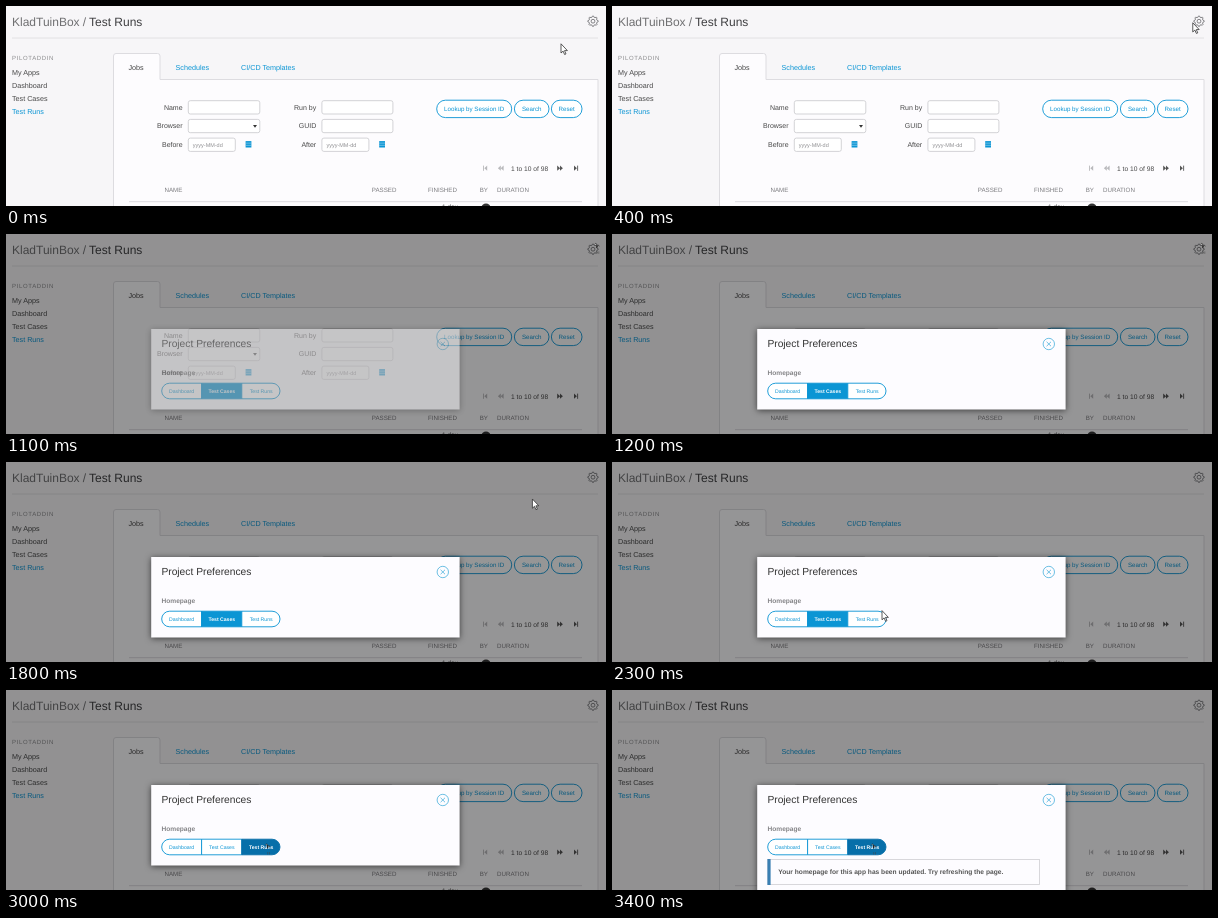
An HTML page for the animation above (3500 ms loop, 600 by 200 pixels).

```html
<!DOCTYPE html>
<html lang="en">
<head>
<meta charset="utf-8">
<title>Project preferences</title>
<style>
  html, body { margin: 0; width: 100%; height: 100%; overflow: hidden; background: #f7f6f8; }
  svg { display: block; width: 600px; height: 200px; }
  text { font-family: "Liberation Sans", Arial, sans-serif; text-rendering: geometricPrecision; white-space: pre; }
</style>
</head>
<body>
<svg id="stage" viewBox="0 0 600 200">
  <g id="page"></g>
  <rect id="dim" width="600" height="200" fill="#000" opacity="0"/>
  <g id="dialog"></g>
  <g id="arrow">
    <path d="M0 0V9.2L2.1 7.3L3.6 10.7L5 10.1L3.5 6.8H6.4Z" fill="#fff" stroke="#333" stroke-width=".8" stroke-linejoin="round"/>
  </g>
  <g id="hand">
    <path d="M-1 .8Q0-.5 1 .8V4.2Q2-.0+3.4 2.9 3 4.7Q4 3.9 4.8 5.2Q6.3 4.7 6.5 6.4V8.6Q6 10 5.3 12H-.4Q-1.4 9.8-3.6 7.2Q-4.1 5.7-2.6 6L-1 7.5Z" fill="#fff" stroke="#222" stroke-width=".9" stroke-linejoin="round"/>
    <path d="M1.2 8V10.5M3 8V10.5" stroke="#444" stroke-width=".5"/>
  </g>
</svg>
<script>
const $ = id => document.getElementById(id);
const BLUE = '#0b95d4', GREY = '#8b8b8d', DARK = '#484848';
const LOOP = 3500, STEP = 100;

function add(parent, tag, attrs, content) {
  const el = document.createElementNS('http://www.w3.org/2000/svg', tag);
  set(el, attrs);
  if (content) el.textContent = content;
  parent.append(el);
  return el;
}
function set(el, attrs) {
  for (const key in attrs) el.setAttribute(key, attrs[key]);
}
const label = (parent, x, y, size, fill, str, more) =>
  add(parent, 'text', { x, y, 'font-size': size, fill, ...more }, str);
const box = (parent, x, y, width, height, fill, more) =>
  add(parent, 'rect', { x, y, width, height, fill, ...more });
const line = (parent, d, stroke, more) =>
  add(parent, 'path', { d, stroke, fill: 'none', ...more });

const page = $('page'), dialog = $('dialog');
const END = { 'text-anchor': 'end' }, MID = { 'text-anchor': 'middle' };

// Header and sidebar
box(page, 0, 0, 600, 200, '#f7f6f8');
label(page, 6, 19.7, 12, '#707072', 'KladTuinBox');
label(page, 76.8, 19.7, 12, '#707072', '/');
label(page, 83, 19.7, 12, '#3f3f41', 'Test Runs');
line(page, 'M6 32H592', '#e2e1e3');
label(page, 6, 53.7, 6, GREY, 'PILOTADDIN', { 'letter-spacing': .65 });
['My Apps', 'Dashboard', 'Test Cases', 'Test Runs'].forEach((str, i) =>
  label(page, 6, 69.2 + i * 12.8, 7.2, i == 3 ? BLUE : DARK, str));

const gear = add(page, 'g', { fill: 'none', transform: 'translate(587 15.2)' });
let cog = '';
for (let i = 0; i < 32; i++) {
  const a = (i - .5) * Math.PI / 16, r = i % 4 < 2 ? 5.2 : 4;
  cog += (i ? 'L' : 'M') + (r * Math.cos(a)).toFixed(2) + ' ' + (r * Math.sin(a)).toFixed(2);
}
add(gear, 'path', { d: cog + 'Z', 'stroke-width': .9 });
add(gear, 'circle', { r: 1.9, 'stroke-width': .9 });

// Panel and tabs
line(page, 'M107.5 201V50Q107.5 47.5 110 47.5H151.5Q154 47.5 154 50V73.5H592V201', '#dddce0', { fill: '#fdfcfe' });
label(page, 122.5, 63.8, 7.2, DARK, 'Jobs');
label(page, 169.5, 63.8, 7.2, BLUE, 'Schedules');
label(page, 235, 63.8, 7.2, BLUE, 'CI/CD Templates');

// Filter form
function field(right, row, name, width) {
  const x = right + 5.7, y = 94.7 + row * 18.7;
  label(page, right, y + 8.8, 7, DARK, name, END);
  box(page, x, y, width, 13.3, '#fff', { rx: 2, stroke: '#cfced2', 'stroke-width': .9 });
  if (row < 2) return;
  label(page, x + 4.5, y + 8.7, 5.5, '#8f8f92', 'yyyy-MM-dd');
  const cx = x + width + 10.3;
  box(page, cx, y + 3, 5.8, 6.4, BLUE);
  line(page, `M${cx} ${y + 5}h5.8m-5.8 2.2h5.8`, '#cfeaf7', { 'stroke-width': .5 });
}
['Name', 'Browser', 'Before'].forEach((name, i) => field(176.6, i, name, i < 2 ? 71.5 : 47));
['Run by', 'GUID', 'After'].forEach((name, i) => field(310.2, i, name, i < 2 ? 71 : 47));
add(page, 'path', { d: 'M247 118.9h4l-2 2.9Z', fill: '#333' });

function pill(x, width, str) {
  box(page, x, 94.2, width, 17.4, '#fff', { rx: 8.7, stroke: BLUE, 'stroke-width': .9 });
  label(page, x + width / 2, 105, 6.2, BLUE, str, MID);
}
pill(430.7, 75, 'Lookup by Session ID');
pill(508.4, 34.6, 'Search');
pill(545.4, 30.6, 'Reset');

// Paging
const tri = (x, dir, fill) => add(page, 'path', { d: `M${x} 159.6v5.2l${2.9 * dir}-2.6Z`, fill });
const bar = (x, fill) => box(page, x, 159.6, .9, 5.2, fill);
const PALE = '#b9b9bc';
bar(477, PALE); tri(481.2, -1, PALE);
tri(494.8, -1, PALE); tri(497.6, -1, PALE);
label(page, 505, 164.8, 6.7, DARK, '1 to 10 of 98');
tri(551.2, 1, '#555'); tri(554, 1, '#555');
tri(568, 1, '#555'); bar(571.2, '#555');

// Table head and the top of its first row
[[158.5, 'NAME'], [365.8, 'PASSED'], [422, 'FINISHED'], [473.7, 'BY'], [491, 'DURATION']]
  .forEach(([x, str]) => label(page, x, 186.4, 6.2, '#7d7d80', str));
line(page, 'M123 195.7H576', '#dcdbdf');
label(page, 436, 203, 6.5, DARK, '1 day');
add(page, 'circle', { cx: 480, cy: 202, r: 4.6, fill: '#333' });

// Dialog
const sheet = box(dialog, 145.2, 95, 308.4, 80.5, '#fdfcff',
  { style: 'filter:drop-shadow(0 1px 3px rgba(0,0,0,.6))' });
label(dialog, 155.4, 113, 10.25, '#333', 'Project Preferences');
add(dialog, 'circle', { cx: 436.8, cy: 110, r: 5.7, fill: 'none', stroke: '#4ab0dc', 'stroke-width': .8 });
line(dialog, 'M434.6 107.8l4.4 4.4m0-4.4l-4.4 4.4', '#4ab0dc', { 'stroke-width': .8 });
label(dialog, 155.5, 141, 6.6, '#858588', 'Homepage', { 'font-weight': 'bold' });

const shapes = [
  'M195.6 149.2H163.7a8 7.8 0 0 0 0 15.6H195.6Z',
  'M195.6 149.2H235.8V164.8H195.6Z',
  'M235.8 149.2H266a8 7.8 0 0 1 0 15.6H235.8Z'
];
const tabs = ['Dashboard', 'Test Cases', 'Test Runs'].map((str, i) => ({
  shape: add(dialog, 'path', { d: shapes[i], 'stroke-width': .9 }),
  text: label(dialog, [175.6, 215.8, 255.2][i], 158.7, 5.15, BLUE, str, MID)
}));
const looks = {
  plain: ['#fff', BLUE, BLUE, 'normal'],
  active: [BLUE, BLUE, '#fff', 'bold'],
  hover: ['#dedde0', '#d2d1d5', '#6290a8', 'normal'],
  pressed: ['#076fa9', '#076fa9', '#fff', 'bold']
};
function paint(tab, look) {
  const [fill, stroke, ink, weight] = looks[look];
  set(tab.shape, { fill, stroke });
  set(tab.text, { fill: ink, 'font-weight': weight });
}

const note = add(dialog, 'g', {});
box(note, 156, 169.5, 271.5, 25, '#fdfcff', { stroke: '#d4d3d8', 'stroke-width': .9 });
box(note, 155.4, 169, 3.2, 26, '#3a7fb2');
label(note, 166.3, 184.3, 6.65, '#555', 'Your homepage for this app has been updated. Try refreshing the page.', { 'font-weight': 'bold' });

// Pointer: time, x, y
const track = [
  [0, 555, 37.8], [600, 589.8, 9.4], [1600, 589.8, 9.4],
  [2300, 270, 148.6], [2700, 260.5, 154], [LOOP, 260.5, 154]
];
const clamp = v => Math.max(0, Math.min(1, v));
const ease = v => v * v * (3 - 2 * v);
function pointer(t) {
  const i = track.findIndex(k => k[0] > t);
  const [t0, x0, y0] = track[i - 1], [t1, x1, y1] = track[i];
  const p = ease((t - t0) / (t1 - t0));
  return [x0 + (x1 - x0) * p, y0 + (y1 - y0) * p];
}

function draw(time) {
  const t = Math.floor(time % LOOP / STEP) * STEP;
  const [x, y] = pointer(t);
  const onGear = x > 581 && y < 21;
  const onTab = t >= 2500;
  const hand = onGear || onTab;
  for (const id of ['arrow', 'hand'])
    set($(id), { transform: `translate(${x} ${y})`, visibility: (id == 'hand') == hand ? 'visible' : 'hidden' });

  set(gear, { stroke: onGear && t < 1100 ? BLUE : '#77777a' });
  set($('dim'), { opacity: t < 1100 ? 0 : .41 });
  set(dialog, { opacity: t < 1100 ? 0 : t < 1200 ? .46 : 1 });

  const clicked = t >= 3000;
  paint(tabs[0], 'plain');
  paint(tabs[1], clicked ? 'plain' : 'active');
  paint(tabs[2], clicked ? 'pressed' : onTab ? 'hover' : 'plain');
  const open = clamp((t - 3000) / 300);
  set(sheet, { height: 80.5 + 32 * open });
  set(note, { opacity: clamp((t - 3100) / 200) });
}

const start = performance.now();
function tick() {
  draw(performance.now() - start);
  requestAnimationFrame(tick);
}
draw(0);
requestAnimationFrame(tick);
</script>
</body>
</html>
```
